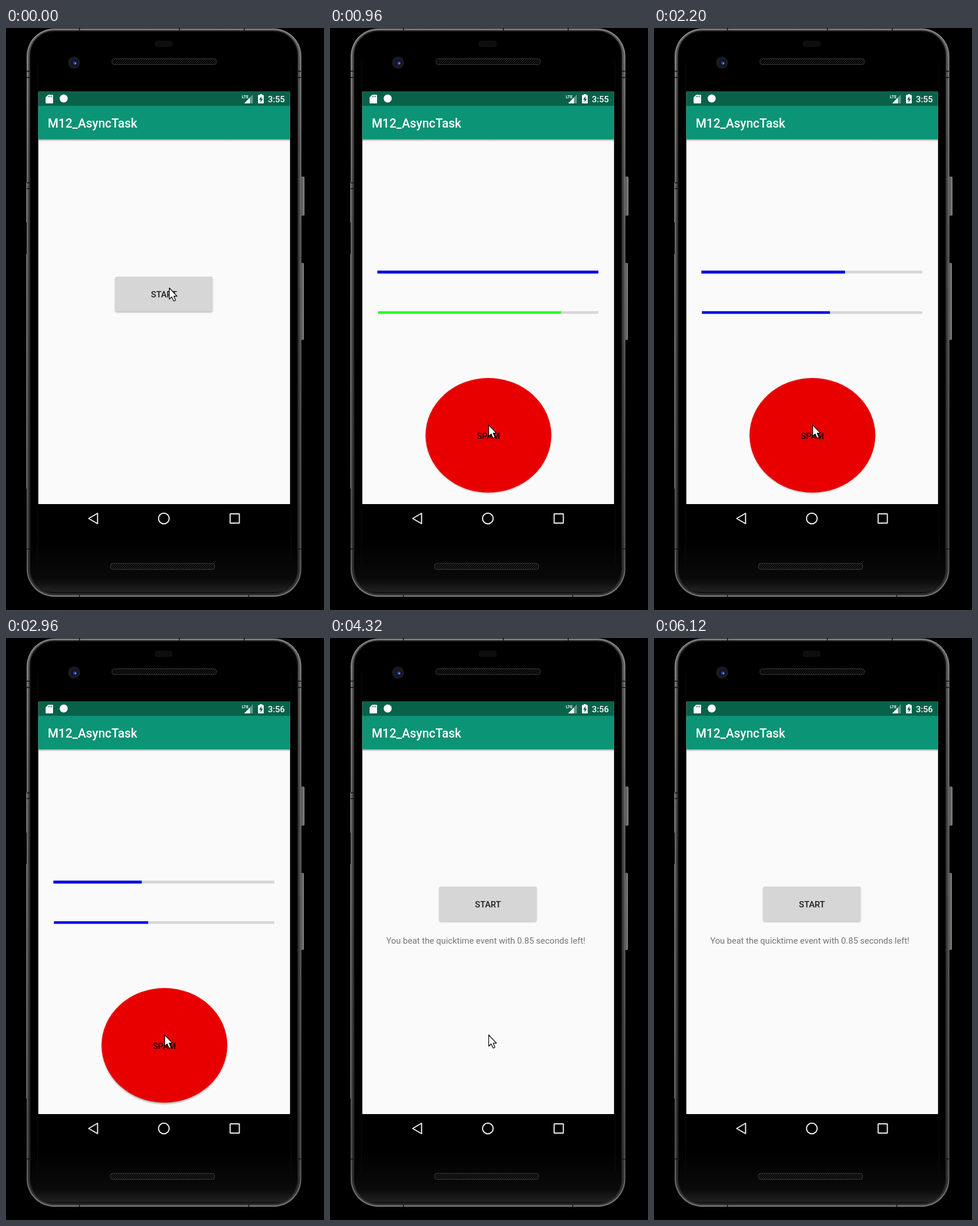
Write an HTML page that moves like this. It is 554 px wide and 1011 px high and loops after 6160 ms.

```html
<!DOCTYPE html>
<html lang="en">
<head>
<meta charset="utf-8">
<title>Quicktime event</title>
<style>
  html, body { margin: 0; width: 100%; height: 100%; overflow: hidden; background: #000; }
  svg { display: block; width: 100%; height: 100%; font: 15px Roboto, sans-serif; }
  .label { font-weight: 500; text-anchor: middle; fill: #000; fill-opacity: .87; }
</style>
</head>
<body>
<svg viewBox="0 0 554 1011">
  <defs>
    <linearGradient id="rim" x2="0" y2="1">
      <stop offset="0" stop-color="#999"/>
      <stop offset=".08" stop-color="#808080"/>
      <stop offset=".35" stop-color="#6a6a6a"/>
      <stop offset=".9" stop-color="#545454"/>
      <stop offset="1" stop-color="#777"/>
    </linearGradient>
    <linearGradient id="bevel" x2="0" y2="1">
      <stop offset="0" stop-color="#5c5c5c"/>
      <stop offset=".3" stop-color="#454545"/>
      <stop offset="1" stop-color="#303030"/>
    </linearGradient>
    <linearGradient id="chin" x2="0" y2="1">
      <stop offset="0" stop-color="#000"/>
      <stop offset=".75" stop-color="#0a0a0a"/>
      <stop offset="1" stop-color="#222"/>
    </linearGradient>
    <linearGradient id="key">
      <stop offset="0" stop-color="#3c3c3c"/>
      <stop offset=".6" stop-color="#666"/>
      <stop offset="1" stop-color="#8a8a8a"/>
    </linearGradient>
    <linearGradient id="drop" x2="0" y2="1">
      <stop offset="0" stop-color="#000" stop-opacity=".38"/>
      <stop offset="1" stop-color="#000" stop-opacity="0"/>
    </linearGradient>
    <pattern id="mesh" width="4" height="4" patternUnits="userSpaceOnUse">
      <path d="M0 4L4 0" stroke="#333" stroke-width="1"/>
    </pattern>
    <filter id="soft" x="-20%" y="-20%" width="140%" height="140%"><feGaussianBlur stdDeviation="1.8"/></filter>
  </defs>

  <!-- Phone body -->
  <rect width="554" height="1011"/>
  <g fill="url(#key)">
    <rect x="512" y="258" width="8" height="68" rx="2"/>
    <rect x="512" y="408" width="7" height="134" rx="2"/>
  </g>
  <rect x="36" y="1" width="478.500" height="987" rx="48" fill="url(#rim)"/>
  <rect x="38" y="2.500" width="474.500" height="983" rx="46" fill="url(#bevel)"/>
  <rect x="42" y="5.500" width="466" height="976" rx="42" fill="#000" stroke="#161616" stroke-width="2"/>
  <path d="M44 890H506V940Q506 980 466 980H85Q44 980 44 940Z" fill="url(#chin)"/>
  <path d="M54.500 60V930M496.500 60V930" stroke="#0d0d0d"/>
  <path d="M35.500 268V338M35.500 393V800" stroke="#666"/>
  <path d="M36 75H44M36 86H44M36 269H44M36 279H44M507 75H514M507 86H514M507 905H514M36 905H44M128 1V5M302 1V5M415 1V5M128 984V988M423 984V988"
        stroke="#111" stroke-width="1.500"/>
  <rect x="259" y="22" width="31" height="11" rx="4" fill="#0e0e0e"/>
  <circle cx="118.500" cy="60" r="10.500" fill="#1b1b1d"/>
  <circle cx="119.500" cy="60.500" r="6" fill="#10142c"/>
  <circle cx="120" cy="61" r="3" fill="#243f9c"/>
  <circle cx="121" cy="61.500" r="1.200" fill="#8ca0df"/>
  <g fill="url(#mesh)" stroke="#3b3b3b">
    <rect x="184.500" y="53.500" width="182" height="10" rx="4"/>
    <rect x="182" y="930" width="181.500" height="10.500" rx="4"/>
  </g>

  <!-- Screen -->
  <rect x="56.300" y="110.700" width="438.500" height="716.300" fill="#fafafa"/>
  <rect x="56.300" y="193" width="438.500" height="4" fill="url(#drop)"/>
  <rect x="56.300" y="135" width="438.500" height="58.300" fill="#0b9475"/>
  <rect x="56.300" y="110.700" width="438.500" height="24.500" fill="#08624a"/>
  <g fill="#fff">
    <path d="M73.500 116H81Q82 116 82 117V130Q82 131 81 131H70Q69 131 69 130V120.500Z"/>
    <path d="M74.500 117.500V120.500M77 117.500V120.500M79.500 117.500V120.500" stroke="#08624a"/>
    <circle cx="100.500" cy="122.500" r="7"/>
    <text x="411" y="122" font-size="7" font-weight="700">LTE</text>
    <path d="M430 115.500V131H415Z" opacity=".35"/>
    <path d="M425 120.700V131H415Z"/>
    <path d="M442 115H446.500V116.500H449V131H439V116.500H442Z"/>
    <path d="M445 118.500L441 124.500H443.500V129L447.500 123H445Z" fill="#08624a"/>
    <text id="clock" x="456.300" y="129" font-weight="500">3:55</text>
    <text x="72.700" y="173.300" font-size="21.300" font-weight="500">M12_AsyncTask</text>
  </g>

  <g id="startScreen">
    <rect id="startShadow" x="190.500" y="433" width="169" height="60" rx="2" opacity=".3" filter="url(#soft)"/>
    <rect x="190.500" y="432" width="169.500" height="60.500" rx="2" fill="#d6d6d6"/>
    <text class="label" x="275.300" y="468">START</text>
    <text id="result" x="98" y="530.500" fill="#757575">You beat the quicktime event with 0.85 seconds left!</text>
  </g>

  <g id="gameScreen">
    <rect x="83" y="421.500" width="384.500" height="5" rx="1" fill="#d6d6d6"/>
    <rect id="clicksBar" x="82.500" y="421.500" height="5" fill="#0000e6"/>
    <rect x="84" y="492" width="383.500" height="4.500" rx="1" fill="#d6d6d6"/>
    <rect id="timeBar" x="83.500" y="492" height="4.500"/>
    <ellipse id="spamShadow" cx="276" cy="709" rx="109" ry="99.500" filter="url(#soft)"/>
    <ellipse cx="276" cy="707.500" rx="109.500" ry="99.500" fill="#e80000"/>
    <text class="label" x="276" y="713.500">SPAM</text>
  </g>

  <path id="cursor" d="M.5 .5V20L4.800 16.200L8 23Q9.500 23.700 11.300 21.800L8.300 14.800H14Z"
        fill="#fff" stroke="#000" stroke-width="1.200" stroke-linejoin="round"/>

  <g fill="none" stroke="#f0f0f0" stroke-width="2">
    <path d="M144 852L159.500 843V861Z" stroke-linejoin="round"/>
    <circle cx="275" cy="852" r="9.300"/>
    <rect x="390.500" y="844" width="16" height="16" rx=".5"/>
  </g>
</svg>
<script>
const LOOP = 6160, FRAME = 40;
const GAME_START = 120, GAME_END = 4240, TIME_LIMIT = 4960;
const CLICKS = 20, FIRST_CLICK = 1149.6, CLICK_PERIOD = 162.67;
const CURSOR_PATH = [[140, 284, 451], [400, 266, 611], [760, 276, 689]];

const el = id => document.getElementById(id);
const set = (id, attrs) => {
  for (const name in attrs) el(id).setAttribute(name, attrs[name]);
};
const show = (id, on) => set(id, { visibility: on ? 'visible' : 'hidden' });
const clamp = (v, lo = 0, hi = 1) => Math.min(hi, Math.max(lo, v));

function cursorAt(t) {
  const [a, b, c] = CURSOR_PATH;
  const [from, to] = t < b[0] ? [a, b] : [b, c];
  const u = clamp((t - from[0]) / (to[0] - from[0]));
  const ease = from === a ? u : 1 - (1 - u) ** 2;
  return [1, 2].map(i => from[i] + (to[i] - from[i]) * ease);
}

// The button rises before each click and drops right after it.
function pressDepth(t) {
  const cycles = (t - FIRST_CLICK) / CLICK_PERIOD;
  if (cycles < -0.5) return 0;
  const phase = (cycles - Math.floor(cycles)) * CLICK_PERIOD;
  return Math.max(1 - phase / 40, clamp((phase - 80) / 80));
}

function draw(t) {
  const playing = t >= GAME_START && t < GAME_END;
  show('startScreen', !playing);
  show('gameScreen', playing);
  show('result', t >= GAME_END);
  show('cursor', t < 5960);
  set('startShadow', { y: t < GAME_START ? 433.7 : 433 });
  el('clock').textContent = t < 2800 ? '3:55' : '3:56';

  const clicked = clamp(Math.floor((t - FIRST_CLICK) / CLICK_PERIOD) + 1, 0, CLICKS);
  const timeLeft = clamp(1 - (t - GAME_START) / TIME_LIMIT);
  set('clicksBar', { width: 385 * (1 - clicked / CLICKS) });
  set('timeBar', {
    width: 384 * timeLeft,
    fill: timeLeft > 2 / 3 ? '#22ff22' : timeLeft > 1 / 3 ? '#0000e6' : '#dc0000'
  });

  const depth = pressDepth(t);
  set('spamShadow', { cy: 708.5 + 2.5 * depth, opacity: 0.3 + 0.08 * depth });
  set('cursor', { transform: `translate(${cursorAt(t)})` });
}

const origin = performance.now();
function tick() {
  const t = (performance.now() - origin) % LOOP;
  draw(Math.floor(t / FRAME) * FRAME);
  requestAnimationFrame(tick);
}
tick();
</script>
</body>
</html>
```
